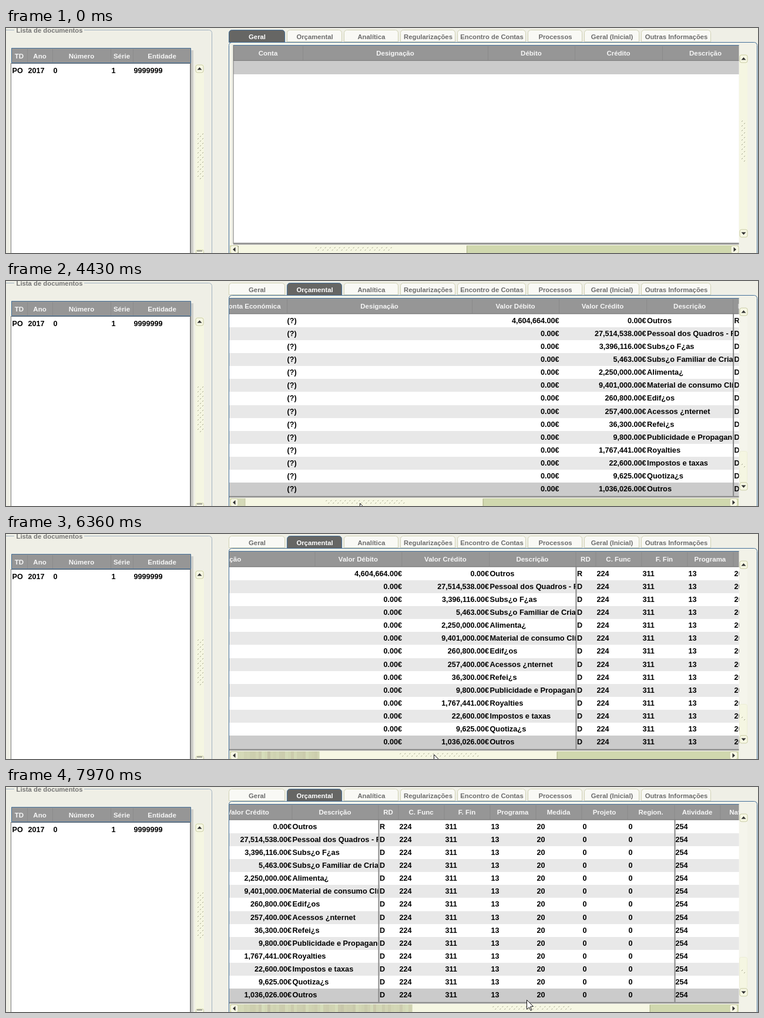
Recreate the animation shown at these times as an HTML page with a canvas. Size 1280 by 384 pixels, loop 8000 ms.

```html
<!DOCTYPE html>
<html lang="pt">
<head>
<meta charset="utf-8">
<style>
html, body { margin: 0; width: 100%; height: 100%; overflow: hidden; background: #efefe6; }
canvas { display: block; width: 1280px; height: 384px; }
</style>
</head>
<body>
<canvas id="stage" width="1280" height="384"></canvas>
<script>
const c = document.getElementById('stage').getContext('2d');
const LOOP = 8000, STEP = 1000 / 13, SCROLL_RATIO = 2.125;
const BG = '#efefe6', BLUE = '#44709a', GREY = '#969696', PALE = '#f5f6e2', EDGE = '#c9cba4';

// Lays names out side by side from their widths
function layout(x, gap, items) {
  return items.map(([name, w, value]) => {
    const item = { name, x, w, mid: x + w / 2, value };
    x += w + gap;
    return item;
  });
}

const tabs = layout(379, 3, [
  ['Geral', 96], ['Orçamental', 94], ['Analítica', 93], ['Regularizações', 94],
  ['Encontro de Contas', 117], ['Processos', 93], ['Geral (Inicial)', 94], ['Outras Informações', 119]
]);
const listColumns = layout(9, 0, [
  ['TD', 27, 'PO'], ['Ano', 43, '2017'], ['Número', 99, '0'], ['Série', 38, '1'], ['Entidade', 99, '9999999']
]);
const columns = layout(387, 0, [
  ['Conta Económica', 118], ['Designação', 315], ['Valor Débito', 148], ['Valor Crédito', 149],
  ['Descrição', 147], ['RD', 34], ['C. Func', 78, '224'], ['F. Fin', 78, '311'], ['Programa', 78, '13'],
  ['Medida', 78, '20'], ['Projeto', 78, '0'], ['Region.', 80, '0'], ['Atividade', 78, '254'], ['Natureza', 80]
]);
const [, label, debit, credit, descr, kind] = columns;
const activity = columns[12];
const generalNames = ['Conta', 'Designação', 'Débito', 'Crédito', 'Descrição'];
const entries = [
  ['0.00', 'Outros'], ['27,514,538.00', 'Pessoal dos Quadros - Regime'], ['3,396,116.00', 'Subs¿o F¿as'],
  ['5,463.00', 'Subs¿o Familiar de Crianças'], ['2,250,000.00', 'Alimenta¿'],
  ['9,401,000.00', 'Material de consumo Clínico'], ['260,800.00', 'Edif¿os'],
  ['257,400.00', 'Acessos ¿nternet'], ['36,300.00', 'Refei¿s'], ['9,800.00', 'Publicidade e Propaganda'],
  ['1,767,441.00', 'Royalties'], ['22,600.00', 'Impostos e taxas'], ['9,625.00', 'Quotiza¿s'],
  ['1,036,026.00', 'Outros']
];

// Moves: start, end, then where to
const pointerMoves = [[70, 700, 517, 5], [940, 1160, 517, 10], [1770, 2170, 577, 227], [2560, 3260, 589, 379]];
const dragMoves = [
  [4180, 4430, 12.7], [4430, 4740, 42], [4910, 5275, 82], [5275, 5968, 119.5],
  [5968, 6440, 143], [6740, 6891, 157], [6891, 7970, 297]
];

function follow(from, moves, t, power) {
  return moves.reduce((at, [a, b, ...to]) => {
    const f = Math.min(1, Math.max(0, (t - a) / (b - a)));
    const eased = 1 - (1 - f) ** power;
    return at.map((v, i) => v + (to[i] - v) * eased);
  }, from);
}

const snap = t => (Math.floor(t / STEP - .58) + .58) * STEP;

function box(color, x, y, w, h) {
  c.fillStyle = color;
  c.fillRect(x, y, w, h);
}

function text(s, x, y, size, color, align = 'left') {
  c.font = `bold ${size}px "Liberation Sans", Arial, sans-serif`;
  c.textAlign = align;
  c.fillStyle = color;
  c.fillText(s, x, y);
}
const head = (s, x, y) => text(s, x, y, 11.5, '#f6f6f6', 'center');
const cell = (s, x, y, align) => text(s, x, y, 12.6, '#000', align);

function paint(fill, stroke) {
  c.lineWidth = 1;
  if (fill) { c.fillStyle = fill; c.fill(); }
  if (stroke) { c.strokeStyle = stroke; c.stroke(); }
}

function round(x, y, w, h, r, fill, stroke) {
  c.beginPath();
  c.roundRect(x, y, w, h, r);
  paint(fill, stroke);
}

function shape(points, fill, stroke) {
  c.beginPath();
  points.forEach(([x, y]) => c.lineTo(x, y));
  c.closePath();
  paint(fill, stroke);
}

function clip(x, y, w, h, body) {
  c.save();
  c.beginPath();
  c.rect(x, y, w, h);
  c.clip();
  body();
  c.restore();
}

// Arrow button; (dx, dy) is the pointing direction
function button(x, y, dx, dy) {
  round(x - 6.5, y - 6.5, 13, 13, 3, '#f7f8e4', EDGE);
  shape([[x + dx * 2.5, y + dy * 2.5], [x - dx * 2 + dy * 4, y - dy * 2 + dx * 4],
         [x - dx * 2 - dy * 4, y - dy * 2 - dx * 4]], '#333');
}

function grip(x, y, w, h) {
  c.beginPath();
  for (let j = 0; j < h - 1; j += 4)
    for (let i = j % 8; i < w - 1; i += 8) {
      c.moveTo(x + i, y + j + 2);
      c.lineTo(x + i + 2, y + j);
    }
  paint(null, '#a5a68c');
}

function drawList() {
  round(-20, 3.5, 370.5, 400, 5, null, '#a0b1c0');
  box(BG, 14, 0, 119, 8);
  text('Lista de documentos', 17.5, 8, 11.3, '#747474');
  box('#cfcfca', 315, 38, 4, 346);
  box('#fff', 9, 60, 304, 324);
  box('#777', 8, 60, 1, 324);
  box('#858585', 313, 60, 2, 324);
  round(9.5, 34.5, 305, 25, 0, GREY, BLUE);
  box('#777', 9, 60, 305, 1);
  for (const { name, x, mid, value } of listColumns) {
    if (x > 9) box('#8b8b8b', x, 36, 1, 23);
    head(name, mid, 51.5);
    cell(value, x + 1.5, 77);
  }
  box(PALE, 322, 62, 15, 322);
  button(329.5, 69.5, 0, -1);
  grip(326, 180, 10, 80);
  round(323.5, 378.5, 13, 13, 3, '#f7f8e4', EDGE);
  box('#444', 325, 380, 9, 1);
}

function drawTabs(active) {
  round(379.5, 24.5, 899, 375, 5, '#f2f2e8', BLUE);
  tabs.forEach(({ name, x, w, mid }, i) => {
    const on = i === active;
    round(x + .5, 3.5, w - 1, on ? 21 : 20, [5, 5, 0, 0], on ? '#666664' : '#f9f9f5', on ? BLUE : '#d0d1b4');
    text(name, mid + .5, 18.5, 11.3, on ? '#fff' : '#6c6c6c', 'center');
  });
}

function drawRow([amount, words], i) {
  const y = Math.round(57 + 22.08 * i), base = y + 15, last = i === entries.length - 1;
  box(last ? '#cbcbcb' : i % 2 ? '#e8e8e8' : '#fff', 388, y, 1800, 22);
  if (last) box('#0000e8', 389, y + 3, 7.5, 15);
  text('0', 389, base, 12.6, last ? '#fff' : '#000');
  cell('(?)', label.x + .5, base);
  cell((i ? '0.00' : '4,604,664.00') + '€', debit.x + debit.w + .5, base, 'right');
  cell(amount + '€', credit.x + credit.w - .5, base, 'right');
  clip(descr.x, y, descr.w, 22, () => text(words, descr.x + 1, base, 12.8, '#000'));
  cell(i ? 'D' : 'R', kind.x + 2.5, base);
  for (const { x, value } of columns) if (value) cell(value, x + 2, base);
}

function drawGrid(budget, filled, shift) {
  clip(380, 28, 867.5, 342, () => {
    c.translate(-shift, 0);
    box('#fff', 387, 56, 1800, 311);
    box(GREY, 387, 29, 1800, 26);
    box(BLUE, 387, 29, 1800, 1);
    box('#7c7c7c', 387, 55, 1800, 1.5);
    columns.forEach(({ name, x, mid }, i) => {
      box('#8a8a8a', x, 31, 1, 24);
      head(budget ? name : generalNames[i] || '', mid, 46.5);
    });
    if (filled) {
      entries.forEach(drawRow);
      for (const { x } of [kind, activity]) box('#888', x, 56, 2, 311);
    } else box('#cbcbcb', 387, 56.5, 1800, 22.5);
    box('#777', 386.5, 29, 1, 339);
    box('#909090', 387, 366.5, 1800, 3);
  });
}

function drawScrollbars(budget, s) {
  box(budget ? '#f5f5ec' : PALE, 1248, 45, 14, 313);
  if (budget) {
    round(1248.5, 290.5, 13, 53, 3, PALE, '#ecedd6');
    grip(1252, 312, 8, 8);
  } else grip(1252, 158, 9, 72);
  button(1255.5, 52.5, 0, -1);
  button(1255.5, 350.5, 0, 1);

  const thumb = 395 + s, width = budget ? 404 : 389;
  box('#d0d8ae', 381, 371, 866, 13);
  // Streaked trail behind the dragged thumb
  for (let x = 395; x < thumb; x += 5) {
    const n = Math.abs(Math.sin(x * 12.9898) * 43758.5) % 1;
    box(`hsl(${58 + n * 14} ${20 + n * 14}% ${72 + n * 8}%)`, x, 371, Math.min(5, thumb - x), 13);
  }
  box('#f6f7e3', thumb, 371, width, 13);
  box('#a9ae85', thumb + width, 372, 1, 12);
  if (!s) box('#333', 394.5, 372, 1, 12);
  grip(thumb + width / 3 + 2, 374, width / 3, 9);
  button(388.5, 378, -1, 0);
  button(budget ? 1238.5 : 1240.5, 378, 1, 0);
}

function drawPointer(x, y, beam) {
  c.save();
  c.translate(Math.round(x) + .5, Math.round(y) + .5);
  if (beam) {
    c.beginPath();
    for (const d of [-1, 1]) {
      c.moveTo(-3.5, d * 8);
      c.lineTo(-1, d * 8);
      c.lineTo(0, d * 7);
      c.lineTo(1, d * 8);
      c.lineTo(3.5, d * 8);
    }
    c.moveTo(0, -7);
    c.lineTo(0, 7);
    paint(null, '#111');
  } else {
    shape([[0, 0], [0, 16], [4, 12.5], [6.5, 18], [8.5, 17], [6, 11.5], [11, 11]], '#fff', '#111');
  }
  c.restore();
}

function draw(time) {
  const t = snap(time);
  const budget = time >= 1300, filled = time >= 1380;
  const [s] = follow([0], dragMoves, t, 1);
  const [x, y] = follow([1153, 345], pointerMoves, t, 1.7);
  box(BG, 0, 0, 1280, 384);
  drawList();
  drawTabs(budget ? 1 : 0);
  drawGrid(budget, filled, s * SCROLL_RATIO);
  drawScrollbars(budget, s);
  // The hand drifts upwards as the drag goes on
  if (time >= 70) drawPointer(x + s, y - 16 * (s / 297) ** 2, filled && y > 56 && y < 366);
}

function loop() {
  draw(performance.now() % LOOP);
  requestAnimationFrame(loop);
}
loop();
</script>
</body>
</html>
```
